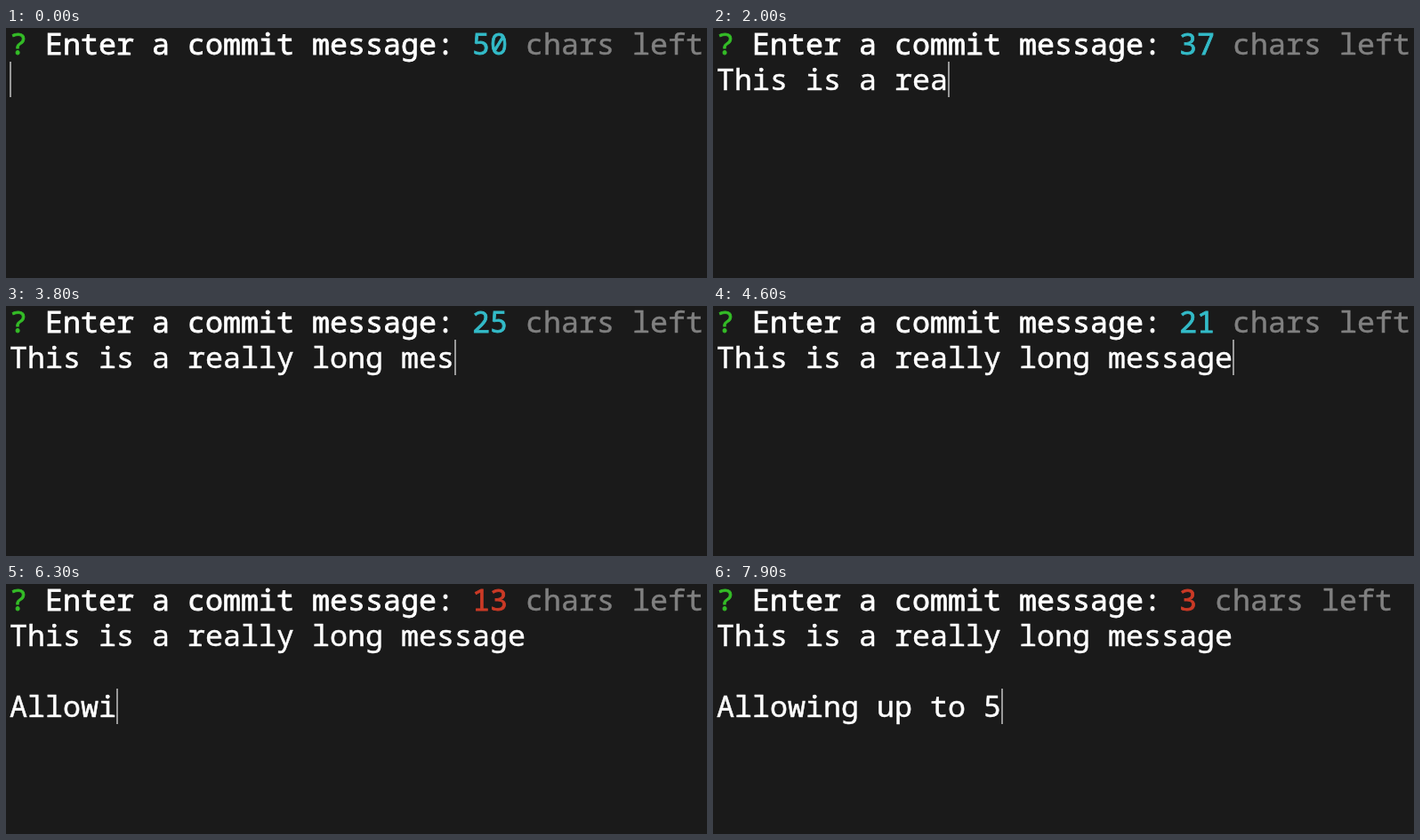
An HTML page for the animation above (8 s loop, 788 by 282 pixels).

```html
<!DOCTYPE html>
<html lang="en">
<head>
<meta charset="utf-8">
<title>Commit message prompt</title>
<style>
  html, body { margin: 0; width: 100%; height: 100%; overflow: hidden; background: #1a1a1a; }
  svg { display: block; }
  text { font: 33.333px "Noto Sans Mono", "DejaVu Sans Mono", monospace; color: #fff; white-space: pre; }
  text, tspan { fill: currentColor; stroke: currentColor; stroke-width: .5px; }
  .prompt { stroke-width: .8px; }
  .mark { color: #34bc27; stroke-width: .8px; }
  .count { color: #33bbc8; stroke-width: .8px; }
  .count.low { color: #cb3a26; }
  .hint { color: #808080; }
</style>
</head>
<body>
<svg width="788" height="282">
  <text class="prompt" x="4" y="30"><tspan class="mark">?</tspan> Enter a commit message: <tspan class="count" id="count"></tspan><tspan class="hint"> chars left</tspan></text>
  <g id="entry">
    <text id="subject" x="4" y="70"></text>
    <text id="body" x="4" y="150"></text>
    <rect id="cursor" width="2" height="40" fill="#999"/>
  </g>
</svg>
<script>
const LOOP = 8000, TICK = 100, LIMIT = 50, LOW = 15, CELL = 20, LINE = 40;
const MESSAGE = "This is a really long message\n\nAllowing up to 5";

// Typing keeps an even pace between these points: [tick, characters typed].
const PACE = [[0, 0], [11, 6], [20, 13], [38, 25], [46, 29], [53, 31], [63, 37], [79, 47]];
// The entry is briefly cleared while the prompt repaints.
const REPAINT_TICK = 11;

const [count, entry, subject, body, cursor] =
  ["count", "entry", "subject", "body", "cursor"].map(id => document.getElementById(id));

function typedAt(tick) {
  const next = Math.max(1, PACE.findIndex(([end]) => tick <= end));
  const [t0, n0] = PACE[next - 1], [t1, n1] = PACE[next];
  return n0 + Math.floor((tick - t0) * (n1 - n0) / (t1 - t0));
}

function draw(time) {
  const tick = Math.floor((time % LOOP) / TICK);
  const typed = typedAt(tick);
  const lines = MESSAGE.slice(0, typed).split("\n");
  const row = lines.length - 1;
  const left = LIMIT - typed;

  count.textContent = left;
  count.classList.toggle("low", left <= LOW);
  subject.textContent = lines[0];
  body.textContent = lines[2] || "";
  cursor.setAttribute("x", 4 + lines[row].length * CELL);
  cursor.setAttribute("y", 38 + row * LINE);
  entry.setAttribute("visibility", tick === REPAINT_TICK ? "hidden" : "visible");
}

const start = performance.now();
function frame() {
  draw(performance.now() - start);
  requestAnimationFrame(frame);
}
frame();
</script>
</body>
</html>
```
